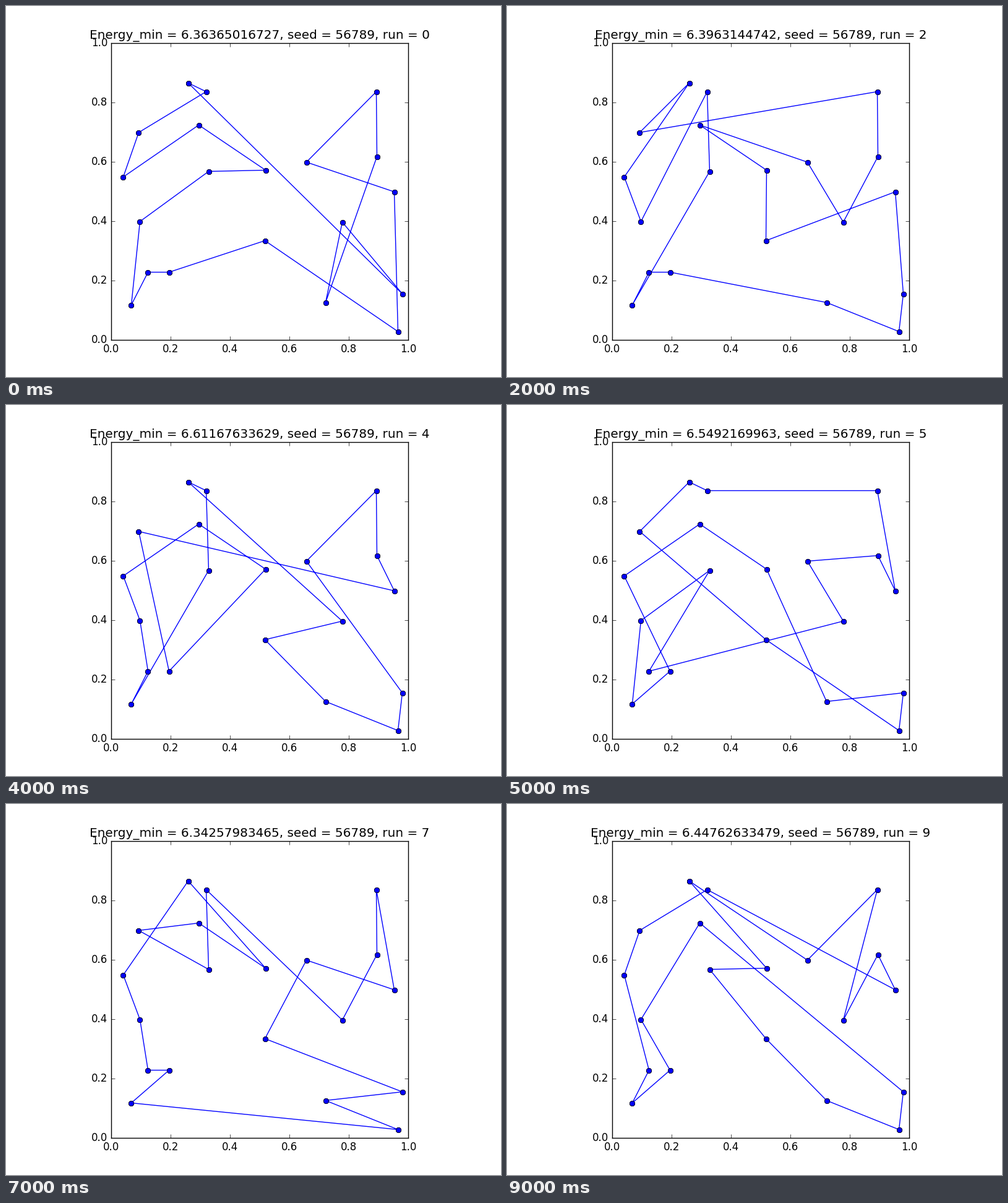
Write a matplotlib script that moves like this. It is 800x600 px and loops after 10000 ms.

```python
import matplotlib.pyplot as plt
import numpy as np
from matplotlib.animation import FuncAnimation

plt.style.use("classic")
plt.rcParams["font.family"] = "DejaVu Sans"

SEED = 56789
LEFT, BOTTOM, SIDE = 170, 540, 480  # axes box in pixels

CITY_PX = {
    "A": (294, 124), "B": (323, 138), "C": (214, 204), "D": (311, 192),
    "E": (189, 276), "F": (327, 267), "G": (419, 265), "H": (216, 348),
    "I": (229, 430), "J": (263, 430), "K": (202, 483), "L": (418, 379),
    "M": (516, 479), "N": (633, 526), "O": (640, 465), "P": (543, 349),
    "Q": (485, 252), "R": (627, 300), "S": (599, 243), "T": (598, 138),
}

# Best tour of each run and its energy; None means measure the tour.
RUNS = [
    ("ABCEDGFHKIJLNRQTSMPO", "6.36365016727"),
    ("ABQGFPMLONJKIEDTSRHC", "6.57356693234"),
    ("ACTSPQDGLRONMJIKFBHE", "6.3963144742"),
    ("ABTSRQPDCEIKHFJNOLMG", None),
    ("ABFKIHEDGJCRSTQONMLP", "6.61167633629"),
    ("ABTRSQPIFHKJEDGMONLC", "6.5492169963"),
    ("ACDEHKIJGFPLOMNSRTBQ", None),
    ("AEHIJKNMOLQRTSPBFCDG", "6.34257983465"),
    ("ACEHIFKJMLNOSRTQBPGD", None),
    ("AQTPSRBCEIKJHDONMLFG", "6.44762633479"),
]


def city(name):
    x, y = CITY_PX[name]
    return (x + 0.5 - LEFT) / SIDE, (BOTTOM - y - 0.5) / SIDE


def closed_path(tour):
    return np.array([city(c) for c in tour + tour[0]])


def tour_length(path):
    return np.hypot(*np.diff(path, axis=0).T).sum()


fig = plt.figure(figsize=(8, 6), dpi=100, facecolor="white")
ax = fig.add_subplot(111, aspect="equal")
ax.set_xlim(0, 1)
ax.set_ylim(0, 1)
ticks = np.linspace(0, 1, 6)
labels = [f"{t:.1f}" for t in ticks]
ax.set_xticks(ticks, labels)
ax.set_yticks(ticks, labels)

route, = ax.plot([], [], "bo-")
# Each city ends two legs, so its marker is laid down twice.
cities, = ax.plot([], [], "bo")
title = ax.set_title("")


def draw(run):
    tour, energy = RUNS[run]
    path = closed_path(tour)
    energy = energy or f"{tour_length(path):.11f}"
    route.set_data(path[:-1, 0], path[:-1, 1])
    route.set_data(path[:, 0], path[:, 1])
    cities.set_data(path[:-1, 0], path[:-1, 1])
    title.set_text(f"Energy_min = {energy}, seed = {SEED}, run = {run}")
    return route, cities, title


anim = FuncAnimation(fig, draw, frames=len(RUNS), interval=1000,
                     init_func=lambda: draw(0), repeat=True, repeat_delay=0)
plt.show()
```
